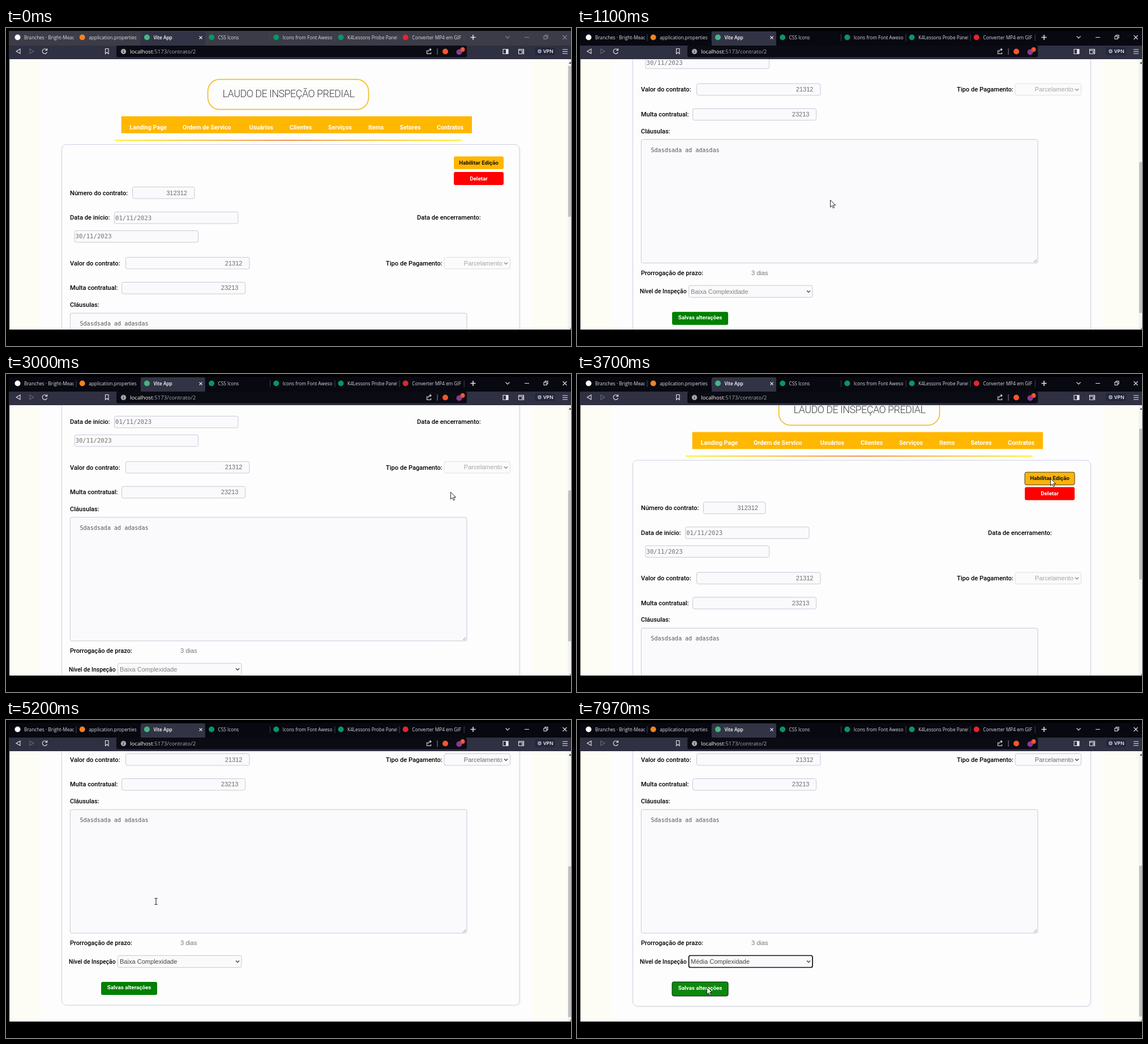
An HTML page for the animation above (8 s loop, 998x561 px).

```html
<!DOCTYPE html>
<html lang="pt">
<head>
<meta charset="utf-8">
<title>Contrato</title>
<style>
  html, body { margin: 0; width: 100%; height: 100%; overflow: hidden; background: #000; }
  svg { display: block; }
  text { white-space: pre; }
  .tab, .url { font-family: "Open Sans", sans-serif; font-size: 8.25px; fill: #dcdce2; }
  .on { font-weight: 600; fill: #fff; }
  .url { font-size: 9.7px; fill: #a9abb8; }
  .title { font: 300 18px Roboto, sans-serif; letter-spacing: -.55px; fill: #444; }
  .nav { font: 700 10.7px Roboto, sans-serif; fill: #fff; }
  .label { font: 500 11.1px Roboto, sans-serif; fill: #000; }
  .button { font: 700 9.8px Roboto, sans-serif; fill: #fff; text-anchor: middle; }
  .value { font: 11.05px "Liberation Sans", sans-serif; fill: #6c6c6c; }
  .date { font: 10.65px "DejaVu Sans Mono", monospace; fill: #727272; }
  .area { font: 10.05px "DejaVu Sans Mono", monospace; fill: #555; }
  .end { text-anchor: end; }
  .field { fill: #fafafc; stroke: #c9c8d8; }
  .icon { fill: none; stroke: #e4e4ea; stroke-width: 1.1; }
</style>
</head>
<body>
<svg id="stage" width="998" height="561" viewBox="0 0 998 561"></svg>
<script>
const LOOP = 8000;

const rect = (x, y, w, h, attrs = '') => `<rect x="${x}" y="${y}" width="${w}" height="${h}" ${attrs}/>`;
const text = (x, y, cls, str, attrs = '') => `<text x="${x}" y="${y}" class="${cls}" ${attrs}>${str}</text>`;
const path = (d, attrs = 'class="icon"') => `<path d="${d}" ${attrs}/>`;
const dot = (x, y, r, fill) => `<circle cx="${x}" cy="${y}" r="${r}" fill="${fill}"/>`;
const field = (x, y, w, h = 21.5, attrs = '') => rect(x + .5, y + .5, w - 1, h - 1, `rx="3" class="field" ${attrs}`);
const arrow = (x, y, id) => path(`M${x - 3} ${y - 1.5}l3 3 3-3`, `id="${id}" fill="none" stroke="#555" stroke-width="1.6"`);

function tabs() {
  const list = [
    ['Branches · Bright-Meado', '#fff'], ['application.properties', '#f58220'],
    ['Vite App', '#42b883'], ['CSS Icons', '#059862'], ['Icons from Font Aweso', '#059862'],
    ['K4Lessons Probe Panels', '#059862'], ['Converter MP4 em GIF', '#e5242c']
  ];
  return list.map(([name, color], i) => {
    const x = 9.5 + i * 114.2, active = i === 2;
    return (active ? rect(x, 6, 114, 26, 'rx="3" fill="#323446"') : '') +
      dot(x + 11, 16.5, 5, color) +
      `<svg x="${x + 22.5}" y="8" width="88" height="18">${text(0, 12, active ? 'tab on' : 'tab', name)}</svg>` +
      (active ? path('M341.5 14.5l5 5m0-5l-5 5') : rect(x + 114, 11, 1, 12, 'fill="#44465a"'));
  }).join('');
}

function chrome() {
  return rect(5, 5, 993, 27, 'id="strip"') + rect(5, 31, 993, 24, 'fill="#2f3142"') +
    tabs() + path('M820.5 16.5h9m-4.5-4.5v9', 'class="icon" style="stroke-width:1.6"') +
    `<g id="controls">${path('M882.5 14.5l3.5 3.5 3.5-3.5M916 16.5h8M950 14.5h5v5h-5zm2 0v-2h5v5h-2M983.5 13l7 7m0-7l-7 7')}</g>` +
    path('M25 37v8l-7-4z') + path('M42 37v8l7-4z', 'class="icon" opacity=".3"') +
    path('M72 38.5a4.3 4.3 0 1 0 .6 4M72.6 36v3.4h-3.4') +
    path('M175.5 36.5h5.5v9l-2.75-2.5-2.75 2.5z') +
    rect(195, 31, 619, 20.5, 'rx="3" fill="#0a0b13"') + dot(207.5, 41.5, 4.7, '#a3a5b0') +
    rect(207, 40.7, 1, 3.3, 'fill="#222"') + rect(207, 38.6, 1, 1, 'fill="#222"') +
    text(219, 44.5, 'url', '<tspan fill="#fff">localhost</tspan>:5173/contrato/2') +
    path('M743.5 39v6.5h7V43M745.5 42c0-3 2-4 5-4m-2-2l2.5 2-2.5 2') + rect(761.5, 36, 1, 11, 'fill="#8b8c98"') +
    dot(776, 41.5, 5, '#fb542b') + dot(800.5, 42.5, 5, '#8b3a8f') + dot(806.5, 38, 4.3, '#e8472b') +
    text(805, 40.4, 'tab', '1', 'style="font-size:6.5px"') +
    path('M878 37.5h9v8h-9z') + rect(883, 37.5, 4, 8, 'fill="#e4e4ea"') +
    path('M905.5 37.5h9v8h-9zm0 2h9m0 2h-3v2h3') +
    rect(934, 34, 36, 14, 'rx="4" fill="#25273a"') + dot(942.5, 41, 3.4, '#9a9bb5') +
    rect(941, 40.5, 3, 1, 'fill="#25273a"') + text(949, 44.3, 'tab on', 'VPN', 'style="font-size:8.8px"') +
    path('M983 38h9m-9 3.5h9m-9 3.5h9');
}

function header() {
  const links = [['Landing Page', 218.5], ['Ordem de Servico', 312], ['Usuários', 429.5], ['Clientes', 501],
    ['Serviços', 569], ['Items', 640], ['Setores', 695.5], ['Contratos', 761]];
  return rect(356.5, 90.7, 284, 53, 'rx="21" fill="#fdfdfd" stroke="#f3bb2c" stroke-width="1.7"') +
    text(382.5, 122, 'title', 'LAUDO DE INSPEÇÃO PREDIAL') +
    rect(203.6, 155.7, 619.4, 30, 'fill="#ffb700"') +
    links.map(([name, x]) => text(x, 178.5, 'nav', name)).join('') +
    rect(192, 197.3, 613, 1.6, 'fill="url(#rule)"');
}

const calendar = (x, y) => path(`M${x - 4} ${y - 3.5}h8v8h-8z`, 'fill="none" stroke="#111" stroke-width="1.2"') +
  rect(x - 4, y - 4.5, 8, 3, 'fill="#111"');

function form() {
  return rect(791, 254, 88, 23, 'rx="3" fill="#f00"') + text(835, 268.6, 'button', 'Deletar') +
    text(113, 295, 'label', 'Número do contrato:') + field(223, 280, 110.5) + text(320, 294.8, 'value end', '312312') +
    text(113, 338.2, 'label', 'Data de início:') + field(191, 324, 219.5) + text(193, 338.5, 'date', '01/11/2023') +
    text(726, 338.2, 'label', 'Data de encerramento:') + field(120.5, 357, 219.5) + text(122.5, 371.3, 'date', '30/11/2023') +
    `<g id="calendars">${calendar(403, 334.5)}${calendar(332, 367.3)}</g>` +
    text(113, 418.8, 'label', 'Valor do contrato:') + field(211, 404, 219.5) + text(417.5, 418.6, 'value end', '21312') +
    text(671, 418.8, 'label', 'Tipo de Pagamento:') +
    `<g id="payment">${field(773.5, 404, 117.5)}${text(877, 418.6, 'value end', 'Parcelamento')}${arrow(883, 415, 'a1')}</g>` +
    text(113, 462.2, 'label', 'Multa contratual:') + field(204, 448, 219) + text(410.5, 462.2, 'value end', '23213') +
    text(113, 492, 'label', 'Cláusulas:') + field(113, 502.5, 701.5, 219) + text(130.5, 525, 'area', 'Sdasdsada ad adasdas') +
    path('M807 719.5l5-5m-2 5l2-2', 'stroke="#888" fill="none"') +
    text(113, 742.2, 'label', 'Prorrogação de prazo:') + text(308, 742, 'value', '3 dias', 'style="fill:#777"') +
    text(111, 774.8, 'label', 'Nível de Inspeção', 'style="font-size:10.4px"') + field(197, 760, 219.5, 22, 'id="level"') +
    text(201, 775, 'value', '', 'id="levelText"') + arrow(409, 771, 'a2') +
    rect(168, 807, 99, 23, 'rx="3" id="save"') + text(217.5, 820.4, 'button', 'Salvas alterações', 'id="saveText"');
}

function page() {
  return rect(6, 55, 992, 477, 'fill="#fdfdfd"') +
    rect(6, 55, 54, 477, 'fill="#fefdf5"') + rect(928, 55, 64, 477, 'fill="#fefdf5"') +
    `<g clip-path="url(#view)"><g id="scroller">` +
    rect(101, 208, 809, 642, 'rx="8" fill="#f7f7f7" id="shadow"') +
    rect(98.5, 205.5, 808.5, 642.5, 'rx="8" fill="#fdfdfd" stroke="#cfcfe2" id="card"') + header() +
    rect(791, 226.5, 88, 22.5, 'rx="3" fill="#ffb700" id="edit"') +
    text(835, 240.8, 'button', 'Habilitar Edição', 'style="fill:#111"') +
    `<g id="form">${form()}</g></g></g>` +
    rect(992, 55, 6, 477, 'fill="#f3f3f3"') + rect(993, 67, 5, 266, 'fill="#c1c1c4" id="thumb"') +
    path('M994 63l2.5-3.5 1.5 2v1.5zM995 529.5h3v2z', 'fill="#555"');
}

const stage = document.getElementById('stage');
stage.innerHTML = `<defs><clipPath id="view">${rect(6, 55, 986, 477)}</clipPath>
  <linearGradient id="rule"><stop stop-color="#fff000"/><stop offset=".5" stop-color="#ee7a28"/><stop offset="1" stop-color="#fff000"/></linearGradient></defs>` +
  rect(0, 0, 998, 561) + chrome() + page() +
  `<g id="cursor">${path('M.5.5v12.5l3-2.7 2 4.4 2-.9-2-4.3h4z', 'id="pointer" fill="#fff" stroke="#111" stroke-width=".9"')}` +
  path('M-2.5-5.5h2l.5.5.5-.5h2M0-5V5M-2.5 5.5h2L0 5l.5.5h2', 'id="beam" fill="none" stroke="#111"') + '</g>';

const $ = id => document.getElementById(id);
const set = (id, attrs) => Object.entries(attrs).forEach(([k, v]) => $(id).setAttribute(k, v));

// Rows are: time, then one or more values.
const scrollSteps = [[520, 0], [700, 73], [820, 146], [920, 219], [1020, 280], [1100, 306], [1230, 345],
  [2850, 345], [3000, 251], [3120, 150], [3250, 54], [4830, 54], [4950, 180], [5050, 290], [5150, 345]];
const cursorSteps = [[250, 480, 532], [500, 447, 303], [2150, 447, 303], [2750, 785, 208], [3050, 785, 208],
  [3400, 836, 184], [3950, 836, 184], [4600, 266, 321], [5200, 265, 320], [5350, 265, 320], [5780, 255, 421],
  [6200, 225, 448], [6550, 140, 458], [6850, 215, 450], [7050, 215, 450], [7450, 229, 471]];

function sample(steps, t, ease = k => k) {
  const next = steps.findIndex(s => s[0] > t);
  if (next === 0) return steps[0].slice(1);
  if (next < 0) return steps[steps.length - 1].slice(1);
  const a = steps[next - 1], b = steps[next], k = ease((t - a[0]) / (b[0] - a[0]));
  return a.slice(1).map((v, i) => v + (b[i + 1] - v) * k);
}
const smooth = k => k * k * (3 - 2 * k);

function draw(t) {
  const [x, y] = sample(cursorSteps, t, smooth);
  const editHover = t >= 3330 && t < 4060, saveHover = t >= 7250;
  const editable = t >= 3850, focused = t >= 5790, grow = saveHover ? 2 : 0;
  const scroll = sample(scrollSteps, t)[0] - (editHover ? .7 : 0);
  const typing = t >= 4900 && t < 5600, inactive = t < 300;

  set('scroller', { transform: `translate(0 ${-scroll})` });
  set('form', { transform: `translate(0 ${editHover ? -1.3 : 0})` });
  set('thumb', { y: 67 + scroll * .5536 - grow / 2 });
  set('strip', { fill: inactive ? '#3c3c48' : '#070810' });
  set('controls', { opacity: inactive ? .45 : 1 });
  set('edit', { stroke: editHover ? '#4a3a10' : 'none', fill: editHover ? '#fbb40a' : '#ffb700' });
  set('calendars', { opacity: editable ? 1 : 0 });
  set('payment', { opacity: editable ? 1 : .6 });
  set('level', { style: focused ? 'stroke:#101010;stroke-width:1.7' : '' });
  set('levelText', { style: `fill:${editable ? '#444' : '#808080'}` });
  $('levelText').textContent = (t < 7000 ? 'Baixa' : 'Média') + ' Complexidade';
  set('save', { height: 23 + grow, fill: saveHover ? '#0d880d' : '#008000', stroke: saveHover ? '#062806' : 'none' });
  set('saveText', { y: 820.4 + grow / 3 });
  set('card', { height: 642.5 + grow });
  set('shadow', { height: 642 + grow });
  set('cursor', { transform: `translate(${x} ${y})`, opacity: t < 250 ? 0 : 1 });
  set('pointer', { opacity: typing ? 0 : 1 });
  set('beam', { opacity: typing ? 1 : 0 });
}

const start = performance.now();
function tick() {
  draw((performance.now() - start) % LOOP);
  requestAnimationFrame(tick);
}
tick();
</script>
</body>
</html>
```
